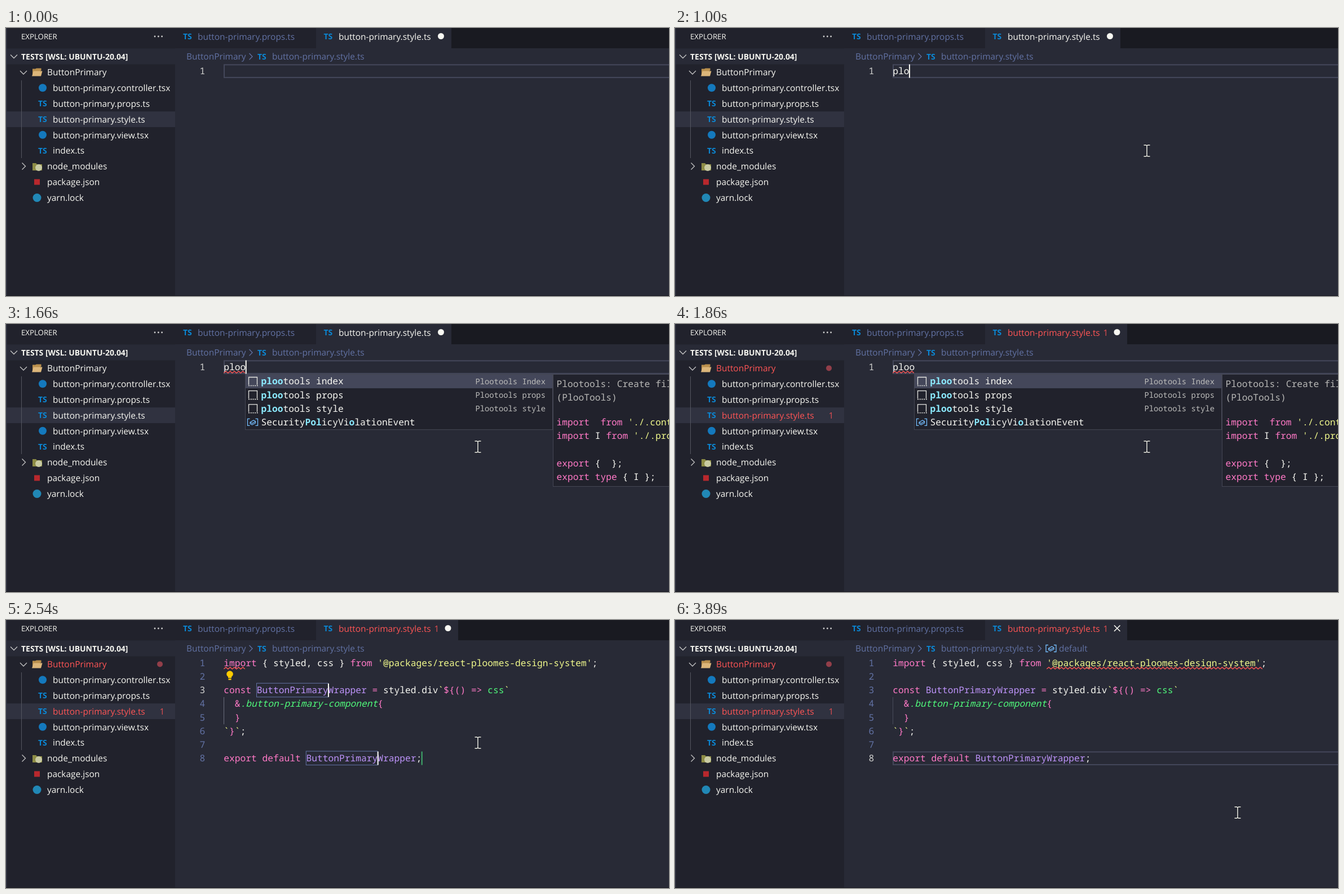
An HTML page that plays this animation: 1176x476 px, repeating every 3960 ms.

```html
<!DOCTYPE html>
<html lang="en">
<head>
<meta charset="utf-8">
<title>Snippet completion</title>
<style>
  html, body { margin: 0; height: 100%; overflow: hidden; background: #282a36; }
  svg { display: block; width: 1176px; height: 476px; }
  text { font: 15.43px "Open Sans", "Noto Sans", sans-serif; fill: #f8f8f2; white-space: pre; text-rendering: geometricPrecision; }
  .mono { font: 500 16.25px "Noto Sans Mono", "DejaVu Sans Mono", monospace; }
  .small { font-size: 13.85px; font-weight: 400; }
  .title { font-size: 13.25px; }
  .section { font-size: 13.95px; font-weight: 700; }
  .ts { font-size: 14px; font-weight: 700; fill: #0b87d4; }
  .match { font-weight: 700; fill: #8be9fd; }
</style>
</head>
<body>
<svg id="stage" viewBox="0 0 1176 476"></svg>
<script>
const LOOP = 3960, CODE_X = 386.3, CHAR = 9.75, LINE = 24.15, ROW = 27.85;
const BG = '#282a36', DARK = '#21222c', LINE_COLOR = '#44475a', MUTED = '#6272a4', RED = '#ff5555', WHITE = '#f8f8f2';
const INK = { p: '#ff79c6', w: WHITE, y: '#f1fa8c', g: '#50fa7b', i: '#50fa7b', v: '#bd93f9', d: '#b9b9b7' };

const rect = (x, y, w, h, fill, more = '') => `<rect x="${x}" y="${y}" width="${w}" height="${h}" fill="${fill}" ${more}/>`;
const dot = (x, y, r, fill) => `<circle cx="${x}" cy="${y}" r="${r}" fill="${fill}"/>`;
const path = (d, stroke, width = 1.3, fill = 'none') => `<path d="${d}" stroke="${stroke}" stroke-width="${width}" fill="${fill}"/>`;
const text = (x, y, s, fill = WHITE, kind = '') => `<text x="${x}" y="${y}" style="fill:${fill}" class="${kind}">${s}</text>`;
const mono = (x, y, s, fill) => text(x, y, s, fill, 'mono');
const ts = (x, y) => `<text x="${x}" y="${y}" class="ts">TS</text>`;
const chevron = (x, y, down) => path(down ? `M${x - 6} ${y - 3}l6 6 6-6` : `M${x - 3} ${y - 6}l6 6-6 6`, '#c5c5c5');
const column = n => CODE_X + n * CHAR;
const lineTop = n => 64.5 + (n - 1) * LINE;

// "~pimport ~w{" : each run starts with a colour key
const code = (x, y, s) => `<text class="mono" x="${x}" y="${y}">` + s.split('~').slice(1).map(run =>
  `<tspan fill="${INK[run[0]]}"${run[0] === 'i' ? ' font-style="italic"' : ''}>${run.slice(1)}</tspan>`).join('') + '</text>';

const caret = (col, line, fill = WHITE) => rect(column(col) - .6, lineTop(line), 2, 24, fill);
const lineBox = line => rect(387, lineTop(line) + .8, 800, 22.6, 'none', `stroke="${LINE_COLOR}" stroke-width="2"`);

function squiggle(from, to) {
  let d = `M${column(from)} 87`;
  for (let x = column(from); x < column(to) - 2; x += 7.5) d += 'l3.75-3 3.75 3';
  return path(d, RED, 1.4);
}

const variableIcon = (x, y) =>
  path(`M${x + 4} ${y - 6}h-4v12h4M${x + 14} ${y - 6}h4v12h-4`, '#75beff') +
  path(`M${x + 4.5} ${y}l6-3.5 3.5 2v3l-6 3-3.5-2zl3.5 2 6-3`, '#75beff', 1.2);
const cubeIcon = (x, y) => path(`M${x + 8} ${y - 8}l7 4v8l-7 4-7-4v-8zM${x + 1} ${y - 4}l7 4 7-4M${x + 8} ${y}v8`, '#b180d7');
const snippetIcon = (x, y) => path(`M${x + .5} ${y + 6}v-13.5h15v13.5`, '#e8e8e4') +
  `<path d="M${x} ${y + 7.5}h17" stroke="#e8e8e4" stroke-width="1.6" stroke-dasharray="2 1.7"/>`;

function sidebar(error) {
  const rowY = i => 78.4 + ROW * i;
  const files = ['button-primary.controller.tsx', 'button-primary.props.ts', 'button-primary.style.ts', 'button-primary.view.tsx', 'index.ts'];
  let s = rect(0, 0, 300, 476, DARK) + rect(0, 36.5, 300, 28, BG) + rect(0, 148.2, 300, ROW, '#303240') + rect(0, 0, 1.5, 476, '#343746');
  s += text(27, 20, 'EXPLORER', WHITE, 'title');
  s += [264, 270.3, 276.6].map(x => dot(x, 15, 1.4, '#d0d0d0')).join('');
  s += chevron(14, 50.5, true) + text(27, 56, 'TESTS [WSL: UBUNTU-20.04]', WHITE, 'section');
  s += chevron(31, 79, true) + path('M47 85V72.5h5l2-1h8.5v4', 'none', 0, '#b98f4d') + path('M46 85.5l3-9h15.5l-2.5 9z', 'none', 0, '#dcb67a');
  s += text(73, 84.4, 'ButtonPrimary', error ? RED : WHITE);
  s += rect(27, 93, 1, 138, '#54565f');
  files.forEach((name, i) => {
    const y = rowY(i + 1), bad = error && i === 2;
    s += name.endsWith('x') ? dot(65, y, 7, '#1479bd') : ts(57, y + 5.2);
    s += text(83, y + 5.8, name, bad ? RED : WHITE);
  });
  if (error) s += dot(273, 78.4, 5, '#923e49') + text(272.5, 167.8, '1', '#e04e51');
  s += chevron(31.5, 245.5) + path('M47 253v-13h6l2 2h9v11z', 'none', 0, '#8d8c45') + dot(58, 248, 6, '#c9cba3');
  s += rect(50, 268.5, 10, 10, '#b8282d') + dot(55, 301.5, 7.5, '#2188b6');
  return s + ['node_modules', 'package.json', 'yarn.lock'].map((name, i) => text(73, rowY(6 + i) + 5.8, name)).join('');
}

function header(t, error) {
  const tabEnd = error ? 802 : 790, markX = error ? 784 : 771.5;
  const separator = x => path(`M${x} 45l5.5 5.7-5.5 5.7`, MUTED);
  let s = rect(300, 0, 876, 36, '#191a21') + rect(300, 0, 249, 36, DARK) + rect(549.5, 0, tabEnd - 549.5, 37, BG);
  s += ts(314, 20) + text(340, 21, 'button-primary.props.ts', MUTED);
  s += ts(563.5, 20) + text(590, 21, 'button-primary.style.ts', error ? RED : WHITE);
  if (error) s += text(759.5, 20.5, '1', '#e04e51');
  s += t < 3480 ? dot(markX, 14.5, 5.5, WHITE) : path('M779 9.5l10.5 10.5M789.5 9.5l-10.5 10.5', WHITE, 1.6);
  s += text(320, 56.3, 'ButtonPrimary', MUTED) + separator(431.5) + ts(446, 56) + text(472, 56.3, 'button-primary.style.ts', MUTED);
  if (t >= 2680) s += separator(644) + variableIcon(658, 50.5) +
    text(681, 56.3, t < 3410 ? 'ButtonPrimaryWrapper' : 'default', MUTED);
  return s;
}

const SNIPPETS = [['[plo]otools index', 'Plootools Index'], ['[plo]otools props', 'Plootools props'], ['[plo]otools style', 'Plootools style']];
const MATCHES = [...SNIPPETS, ['[p]arseF[lo]at'], ['Security[Pol]icyViolationEvent'], ['[p]ers[o]na[l]bar'],
  ['[p]ub[l]ic meth[o]d', 'Public Method Definition'], ['Navigation[P]re[lo]adManager'],
  ['[P]erformance[O]bserverEntry[L]ist'], ['device[P]ixe[l]Rati[o]'], ['SVGText[Po]sitioningE[l]ement'], ['Style[P]ropertyMapRead[O]n[l]y']];
const NARROWED = [...SNIPPETS.map(([name, info]) => [name.replace('plo]o', 'ploo]'), info]), ['Security[Pol]icyVi[o]lationEvent']];

const INDEX_DOC = ['~dPlootools: Create files index', '~d(PlooTools)', "~pimport  from ~y'./.controller'~w;", "~pimport ~wI ~pfrom ~y'./.props'~w;",
  '', '~pexport ~w{  };', '~pexport type ~w{ I };'];
const STYLE_DOC = ['~dPlootools: Create style (PlooTool', '~ds)', '~pimport ~w{ styled, css } ~pfrom', '', '~pconst ~wWrapper ~p= ~wstyled.div',
  '~w    ~p&~i.-component~w{', '~w    }', '~y`~p}~y`~w;', '', '~pexport default ~wWrapper;'];

function details(x, doc, bottom, scrollbar) {
  let s = rect(x + .5, 89.5, 300, bottom - 90, DARK, 'stroke="#454754"');
  doc.forEach((line, i) => s += code(x + 6.5, 112.3 + i * LINE + (i > 1 ? 19.5 : 0), line));
  return s + (scrollbar ? rect(x + 1, 347, 300, 13.5, '#42434b') : '');
}

function popup(t, typed) {
  const x = Math.round(column(typed.length)) - 1, items = typed === 'plo' ? MATCHES : NARROWED;
  const hovered = typed === 'plo' && t >= 1130 ? 5 : -1, selected = t < 1870 ? 0 : t < 1930 ? 1 : 2;
  let s = rect(x + .5, 89.5, 545, items.length * LINE + 1.5, DARK, 'stroke="#454754"');
  items.forEach(([name, info], i) => {
    const top = 90 + i * LINE, mid = top + 12, isFunction = name.includes('arse');
    if (i === selected || i === hovered) s += rect(x + 1, top, 544, LINE, i === selected ? LINE_COLOR : '#30323e');
    s += info ? snippetIcon(x + 6, mid) : isFunction ? cubeIcon(x + 6, mid) : variableIcon(x + 4.5, mid);
    s += mono(x + 28.5, mid + 5.4, name.replace(/\[(.+?)\]/g, '<tspan class="match">$1</tspan>'), WHITE);
    if (info) s += `<text class="mono small" x="${x + 533}" y="${mid + 4.6}" text-anchor="end" style="fill:#bdbdbb">${info}</text>`;
  });
  if (t >= 1130) s += t < 2060 ? details(x + 546, INDEX_DOC, 289) : details(x + 546, STYLE_DOC, 361, true);
  return s;
}

const PROGRAM = ["~pimport ~w{ styled, css } ~pfrom ~y'@packages/react-ploomes-design-system'~w;", '',
  '~pconst ~vButtonPrimaryWrapper ~p= ~wstyled.div~y`~p${() => ~gcss~y`', '~w  ~p&~i.button-primary-component~p{', '~w  ~p}',
  '~y`~p}~y`~w;', '', '~pexport default ~vButtonPrimaryWrapper~w;'];

function program(t) {
  const editing = t < 3210, active = editing ? 3 : 8;
  let s = rect(386, lineTop(4), 1, LINE * 2, editing ? '#6a6d7c' : '#484b5a');
  if (!editing) s += lineBox(8);
  PROGRAM.forEach((line, i) => {
    s += mono(343.5, 82 + i * LINE, i + 1, i + 1 === active ? '#d0d0ce' : MUTED) + code(CODE_X, 82 + i * LINE, line);
  });
  s += t < 2740 ? squiggle(0, 4) : t >= 2880 ? squiggle(28, 67) : '';
  if (editing) {
    const blink = t < 2680 || t >= 3010;
    for (const [col, line] of [[6, 3], [15, 8]]) {
      s += rect(column(col) - .3, lineTop(line) - .5, 127, 24.5, 'none', `stroke="${MUTED}"`);
      if (blink) s += caret(col + 13, line);
    }
    s += caret(36, 8, '#3fae6c');
    if (t >= 2540) s += dot(397, 96, 5.8, '#ffcc00') + rect(394, 99, 6, 4, '#ffcc00') + rect(394.5, 104, 5, 2.5, '#ffcc00');
  } else if (t < 3680) s += caret(36, 8);
  return s;
}

function pointer(t) {
  if (t < 70) return '';
  let x = 837, y = 218;
  if (t < 340) {
    const k = Math.floor((t - 70) / 67.5) / 4, ease = k * (2 - k);
    x = 1081 - 244 * ease; y = 425 - 207 * ease;
  } else if (t >= 3610) {
    const k = Math.min(1, Math.floor((t - 3540) / 70) / 5);
    x += 161 * k ** 1.36; y += 124 * k;
  }
  if (t >= 1130 && t < 1190)
    return path('M834 220q2.5-3 4.5 0v7q3-1.5 4 1 3-1 4 1.5 3 0 3 3v5q0 3-2.5 5h-9q-2-4-6.5-9-1-3 2.5-2z', '#202020', 1, '#ffffff') +
      path('M838.5 227v5M842.5 229v4M846 230v3', '#303030', .9);
  const beam = `M${x - 5.5} ${y - 10}h4l1.5 1 1.5-1h4M${x} ${y - 9}v18M${x - 5.5} ${y + 10}h4l1.5-1 1.5 1h4`;
  return path(beam, '#17181e', 3) + path(beam, '#f4f4ee', 1.5);
}

function scene(t) {
  const error = t >= 1800;
  let s = rect(0, 0, 1176, 476, BG) + sidebar(error) + header(t, error);
  if (t < 2190) {
    const typed = 'ploo'.slice(0, t < 800 ? 0 : t < 930 ? 1 : t < 1000 ? 2 : t < 1190 ? 3 : 4);
    s += lineBox(1) + mono(343.5, 82, 1, '#d0d0ce') + mono(CODE_X, 82, typed, WHITE);
    if (t >= 1660) s += squiggle(0, 4);
    if (t >= 200 && t < 1730) s += caret(typed.length, 1);
    if (t >= 1070) s += popup(t, typed);
  } else s += program(t);
  return s + rect(0, 475, 1176, 1, '#191a21') + pointer(t);
}

const stage = document.getElementById('stage');
let shown = '';
function draw() {
  const next = scene(performance.now() % LOOP);
  if (next !== shown) stage.innerHTML = shown = next;
  requestAnimationFrame(draw);
}
draw();
</script>
</body>
</html>
```
